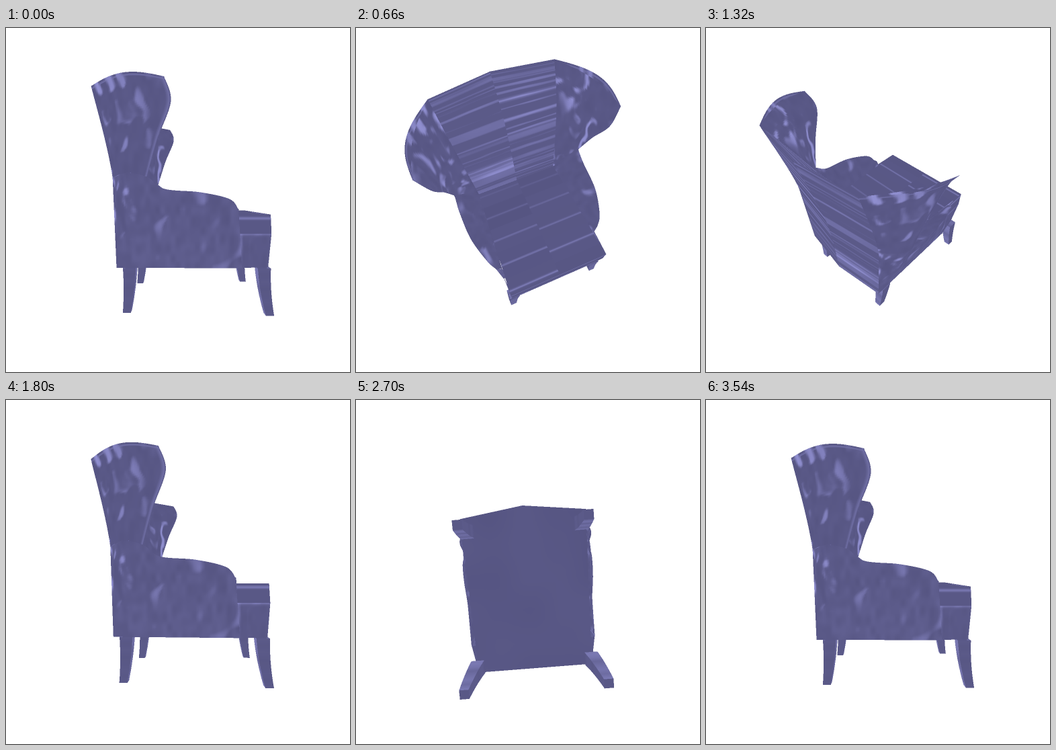
These frames come from a looping animation (512 px wide and 512 px high, 3600 ms). An HTML page with a canvas:

```html
<!DOCTYPE html>
<html>
<head>
<meta charset="utf-8">
<style>
  html, body { margin: 0; width: 100%; height: 100%; overflow: hidden; background: #fff; }
  canvas { display: block; width: 512px; height: 512px; }
</style>
</head>
<body>
<canvas id="stage" width="512" height="512"></canvas>
<script>
const SIZE = 512, N = SIZE * 2, DIST = 443.4;
const STEP = 60, STEPS = 60;
const DARK = [86, 85, 130], LIGHT = [144, 143, 208];

// --- helpers -------------------------------------------------------------
const clamp = (x, a = 0, b = 1) => Math.min(b, Math.max(a, x));
const mix = (a, b, t) => a + (b - a) * t;
const smooth = (a, b, x) => { const t = clamp((x - a) / (b - a)); return t * t * (3 - 2 * t); };
const ridge = (pos, width) => 1 - smooth(0, width, Math.abs(pos));
const hash = (x, y, z) => {
  const s = Math.sin(x * 127.1 + y * 311.7 + z * 74.7) * 43758.5453;
  return s - Math.floor(s);
};
function noise(x, y, z) {
  const i = Math.floor(x), j = Math.floor(y), k = Math.floor(z);
  const a = smooth(0, 1, x - i), b = smooth(0, 1, y - j), c = smooth(0, 1, z - k);
  const row = (dj, dk) => mix(hash(i, j + dj, k + dk), hash(i + 1, j + dj, k + dk), a);
  return mix(mix(row(0, 0), row(1, 0), b), mix(row(0, 1), row(1, 1), b), c);
}

// --- surface tones: 0 is dark, 1 is light --------------------------------
function folds([x, y, z], scale, amount) {
  const warp = noise(x / scale / 2, y / scale / 2, z / scale / 2) * 2;
  const blotch = noise(x / scale + warp, y / scale / 1.9 - warp, z / scale);
  const area = smooth(.25, .6, noise(x / 26 + 5, y / 30, z / 26));
  return smooth(.56, .86, blotch) * area * amount + .1 * noise(x / 6, y / 12, z / 6);
}
const wingTone = (u, v, p) =>
  Math.max(folds(p, 8, mix(1, .35, v)), .5 * ridge(u - .05, .025), .5 * ridge(v - .97, .03));
const innerTone = (u, v, p) => folds(p, 8, .95);
const sideTone = (u, v, p) => folds(p, 8, smooth(.35, .05, u)) + folds(p, 15, .6 * smooth(.1, .4, u));
const armTone = (u, v, p) => folds(p, 12, .7);
const frontTone = (u, v, p) => .15 + folds(p, 10, .7);
const edgeTone = u => .6 * ridge(u - .2, .12) + .05;
const bottomTone = (u, v, [x, y, z]) => .06 * noise(x / 40, z / 40, 2);

// Thin stripes across the upholstery, shifted between the two halves.
function rowsTone(u, v, [x, y, z]) {
  const half = z > 0 ? 3 : 11, slant = u + .006 * v;
  const band = smooth(.6, .8, noise(slant * 26, half, 0));
  const line = smooth(.74, .9, noise(slant * 75, half, 4));
  return (.4 * band + .55 * line) * mix(.5, 1, noise(v * 2, u * 12, half)) + .08;
}
function seatTone(u, v, [x, y, z]) {
  const pitch = 37, pos = x + (z > 0 ? 39 : 68);
  const offset = pos - pitch * Math.round(pos / pitch);
  return .7 * ridge(offset, 2.2) * mix(.2, 1, u) + .06 * hash(Math.round(pos / pitch), z > 0, 0);
}

// --- mesh ----------------------------------------------------------------
// Axes: x to the front of the chair, y up, z to its right side.
const points = [], tones = [], faces = [];

const blend = (a, b, t) => a.map((x, k) => mix(x, b[k], t));
const line = (a, b) => t => blend(a, b, t);
const curve = (...list) => t => {
  const pos = t * (list.length - 1);
  const i = Math.min(Math.floor(pos), list.length - 2), f = pos - i;
  const b = list[i], c = list[i + 1];
  const a = list[i - 1] || b, d = list[i + 2] || c;
  return b.map((_, k) => b[k] + f * .5 * (c[k] - a[k] + f * (2 * a[k] - 5 * b[k] +
    4 * c[k] - d[k] + f * (3 * (b[k] - c[k]) + d[k] - a[k]))));
};
// Surface between two curves, swollen in the middle by a bulge.
const loft = (a, b, bulge = [0, 0, 0]) => (u, v) =>
  blend(a(u), b(u), v).map((x, k) => x + bulge[k] * Math.sin(Math.PI * v));
const quad = (a, b, c, d) => loft(line(a, b), line(c, d));

// Adds a surface and its mirror image.
function both(surface, nu, nv, tone) {
  for (const side of [1, -1]) {
    const base = points.length;
    for (let j = 0; j <= nv; j++) {
      for (let i = 0; i <= nu; i++) {
        const u = i / nu, v = j / nv;
        const [x, y, z] = surface(u, v);
        const p = [x, y, z * side];
        points.push(p);
        // Centre points keep the tone of their own half.
        tones.push(clamp(tone(u, v, [x, y, (z + .01) * side])));
        if (i < nu && j < nv) {
          const a = base + j * (nu + 1) + i, b = a + nu + 1;
          faces.push([a, a + 1, b], [a + 1, b + 1, b]);
        }
      }
    }
  }
}

const corner = [-106, 139, 80], crest = [-117, 140, 0];
const hip = [-80, 27, 79], heel = [-76, -84, 75], tail = [-86, -84, 0];
const wingEnd = [-36, 27, 97], seatEnd = [-46, -18, 64];
const armEnd = [74, -12, 80], armFoot = [79, -84, 76];

const backEdge = curve(corner, hip, heel);
const spine = curve(crest, [-93, 27, 0], tail);
const innerEdge = curve(corner, [-76, 84, 74], seatEnd);
const innerSpine = curve(crest, [-77, 84, 0], [-46, -18, 0]);
const wingFront = curve([-15, 133, 123], [-8, 110, 111], [-23, 70, 104], wingEnd);
const bodyTop = curve(hip, [-58, 31, 102], wingEnd, [-16, 13, 99], [26, 9, 97], [62, 1, 87], armEnd);

// wings and backrest
both(loft(t => backEdge(t / 2), wingFront, [0, 4, 15]), 56, 44, wingTone);
both(loft(wingFront, innerEdge, [0, 2, 8]), 60, 40, innerTone);
both(loft(innerEdge, innerSpine), 150, 10, rowsTone);
both(loft(backEdge, spine), 150, 10, rowsTone);

// arms: outer side, inner side, front
both(loft(bodyTop, line(heel, armFoot)), 70, 44, sideTone);
both(loft(t => bodyTop(mix(1 / 3, 1, t)), line(seatEnd, [76, -20, 72]), [0, 4, 0]), 44, 16, armTone);
both(quad(armEnd, armFoot, [76, -20, 72], [79, -84, 70]), 20, 4, frontTone);

// seat cushion, apron and underside
const lip = [115, -18, 74], seam = [116, -42, 74], hem = [113, -84, 70];
const middle = ([x, y]) => [x, y, 0];
both(quad(seatEnd, lip, middle(seatEnd), middle(lip)), 110, 8, seatTone);
both(quad(lip, seam, middle(lip), middle(seam)), 16, 8, edgeTone);
both(quad([72, -18, 74], [72, -42, 74], lip, seam), 16, 8, edgeTone);
both(quad(seam, hem, middle(seam), middle(hem)), 16, 26, frontTone);
both(quad([76, -42, 75], [77, -84, 76], seam, hem), 16, 16, (u, v, p) => folds(p, 9, .8) + .5 * ridge(u, .08));
both(quad(heel, hem, tail, middle(hem)), 24, 16, bottomTone);

// A leg is a tapering square tube, closed at the foot.
function leg(top, foot) {
  const at = (turn, v) => {
    const half = mix(8, 5, v), a = Math.PI * (turn * 2 + .25);
    const [x, z] = [mix(top[0], foot[0], v * v), mix(top[1], foot[1], v)];
    const round = w => clamp(w * 9, -1, 1) * half;
    return [x + round(Math.cos(a)), mix(-84, -141, v), z + round(Math.sin(a))];
  };
  both(at, 32, 14, (u, v) => {
    const face = Math.floor(u * 4) % 4;
    return (face % 2 ? .5 : .08) * (.4 + noise(v * 7, face, 2));
  });
  both((u, v) => blend(at(u, 1), [foot[0], -141, foot[1]], v), 32, 1, () => .05);
}
leg([-60, 68], [-64, 66]);
leg([106, 70], [112, 76]);

// --- renderer ------------------------------------------------------------
const stage = document.getElementById('stage').getContext('2d');
const buffer = document.createElement('canvas');
buffer.width = buffer.height = N;
const bufferCtx = buffer.getContext('2d');
const image = bufferCtx.createImageData(N, N);
const pixels = new Uint32Array(image.data.buffer);
const depth = new Float32Array(N * N);
const palette = Uint32Array.from({ length: 256 }, (_, i) => {
  const [r, g, b] = blend(DARK, LIGHT, i / 255).map(Math.round);
  return (255 << 24 | b << 16 | g << 8 | r) >>> 0;
});
const sx = new Float32Array(points.length);
const sy = new Float32Array(points.length);
const sw = new Float32Array(points.length);

// The camera's azimuth and elevation both equal the angle; it stays upright.
function project(angle) {
  const s = Math.sin(angle), c = Math.cos(angle);
  const cx = c * s, cy = s, cz = c * c;
  const len = Math.hypot(cx, cz);
  const rx = cz / len, rz = -cx / len;
  const ux = cy * rz, uy = cz * rx - cx * rz, uz = -cy * rx;
  points.forEach(([x, y, z], i) => {
    const w = DIST / (DIST - (x * cx + y * cy + z * cz));
    sx[i] = N / 2 + 2 * w * (x * rx + z * rz);
    sy[i] = N / 2 - 2 * w * (x * ux + y * uy + z * uz);
    sw[i] = w;
  });
}

function fill([a, b, c]) {
  const ax = sx[a], ay = sy[a], bx = sx[b], by = sy[b], cx = sx[c], cy = sy[c];
  const area = (bx - ax) * (cy - ay) - (by - ay) * (cx - ax);
  if (Math.abs(area) < 1e-6) return;
  const x0 = Math.max(0, Math.ceil(Math.min(ax, bx, cx) - .5));
  const x1 = Math.min(N - 1, Math.floor(Math.max(ax, bx, cx) - .5));
  const y0 = Math.max(0, Math.ceil(Math.min(ay, by, cy) - .5));
  const y1 = Math.min(N - 1, Math.floor(Math.max(ay, by, cy) - .5));
  for (let y = y0; y <= y1; y++) {
    for (let x = x0; x <= x1; x++) {
      const px = x + .5 - ax, py = y + .5 - ay;
      const q = (px * (cy - ay) - py * (cx - ax)) / area;
      const r = (py * (bx - ax) - px * (by - ay)) / area;
      if (q < -1e-4 || r < -1e-4 || q + r > 1.0001) continue;
      const w = sw[a] + q * (sw[b] - sw[a]) + r * (sw[c] - sw[a]);
      const k = y * N + x;
      if (w <= depth[k]) continue;
      depth[k] = w;
      const tone = tones[a] + q * (tones[b] - tones[a]) + r * (tones[c] - tones[a]);
      pixels[k] = palette[clamp(tone * 255 | 0, 0, 255)];
    }
  }
}

function render(step) {
  project(2 * Math.PI * step / (STEPS - 1));
  pixels.fill(0xffffffff);
  depth.fill(0);
  faces.forEach(fill);
  bufferCtx.putImageData(image, 0, 0);
  stage.drawImage(buffer, 0, 0, SIZE, SIZE);
}

let shown = -1;
function tick() {
  const step = Math.floor(performance.now() / STEP) % STEPS;
  if (step !== shown) render(shown = step);
  requestAnimationFrame(tick);
}
tick();
</script>
</body>
</html>
```
